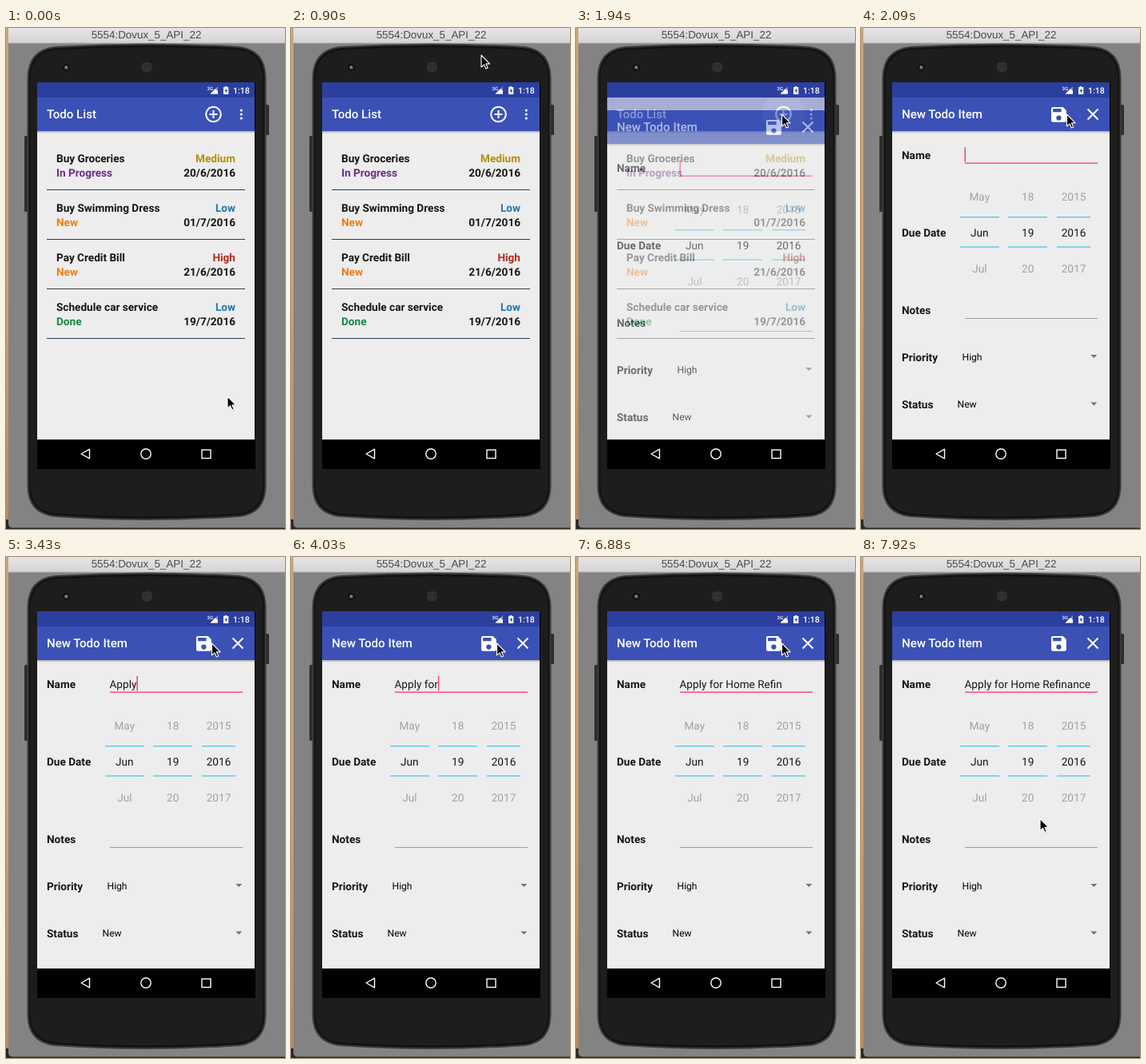
Write an HTML page that moves like this. It is 349x627 px and loops after 8000 ms.

```html
<!DOCTYPE html>
<html lang="en">
<head>
<meta charset="utf-8">
<title>Todo List</title>
<style>
html, body { margin: 0; width: 100%; height: 100%; overflow: hidden; background: #838383; }
svg { display: block; width: 349px; height: 627px; }
text { font: 400 13.6px Roboto, sans-serif; fill: #161616; text-rendering: geometricPrecision; white-space: pre; }
.b { font-weight: 700; }
.bar { font-size: 15.1px; font-weight: 500; fill: #fff; }
.spin { font-size: 12.1px; fill: #000; }
.end { text-anchor: end; }
.mid { text-anchor: middle; }
.dim { fill: #a0a0a0; }
</style>
</head>
<body>
<svg viewBox="0 0 349 627" xmlns="http://www.w3.org/2000/svg">
  <defs>
    <linearGradient id="wood" x2="0" y2="1">
      <stop offset="0" stop-color="#c9a47c"/><stop offset=".5" stop-color="#d3a26c"/><stop offset="1" stop-color="#bd8a58"/>
    </linearGradient>
    <linearGradient id="titleBg" x2="0" y2="1">
      <stop offset="0" stop-color="#e6e4e6"/><stop offset="1" stop-color="#d5d3d5"/>
    </linearGradient>
    <linearGradient id="shade" x2="0" y2="1">
      <stop offset="0" stop-color="#000" stop-opacity=".28"/><stop offset="1" stop-color="#000" stop-opacity="0"/>
    </linearGradient>
    <pattern id="mesh" width="2.4" height="2.4" patternUnits="userSpaceOnUse">
      <rect width="2.4" height="2.4" fill="#232323"/><circle cx="1.2" cy="1.2" r=".7" fill="#555"/>
    </pattern>
    <clipPath id="screen"><rect x="39" y="68" width="272" height="447"/></clipPath>
    <clipPath id="bar"><rect x="39" y="87" width="272" height="42"/></clipPath>
  </defs>

  <!-- window -->
  <rect width="349" height="627" fill="#838383"/>
  <rect width="3" height="616" fill="url(#wood)"/>
  <path d="M0 615H3V621Q3.500 625 8 625.500H349V627H0Z" fill="#2c2724"/>
  <rect x="3" width="346" height="19" fill="url(#titleBg)"/>
  <rect x="3" y="18.500" width="346" height="1" fill="#a9a8a9"/>
  <text x="175.500" y="13" class="mid" style="font:13.4px 'Liberation Sans',Arial,sans-serif;fill:#4a4a4a">5554:Dovux_5_API_22</text>

  <!-- phone -->
  <rect x="23" y="135" width="5" height="95" rx="1.500" fill="#2d2d2d"/>
  <rect x="324" y="96" width="5" height="38" rx="1.500" fill="#2d2d2d"/>
  <path d="M26.500 62Q27 27 61 23Q176 16 292 23Q325 27 325.500 62V574Q325 608 292 612Q176 620 61 612Q27 608 26.500 574Z" fill="#3b3b3b"/>
  <path d="M28.500 62Q29 29 61 25Q176 18 292 25Q323 29 323.500 62V574Q323 606 292 610Q176 618 61 610Q29 606 28.500 574Z" fill="#121212"/>
  <path d="M30.500 63Q31 31 62 27.500Q176 21 291 27.500Q321 31 321.500 63V573Q321 604 291 607.500Q176 615 62 607.500Q31 604 30.500 573Z" fill="#1d1d1d"/>
  <circle cx="75.500" cy="49.500" r="4.500" fill="#0f0f12"/>
  <circle cx="75.500" cy="49.500" r="2.500" fill="#4c4f62"/>
  <circle cx="75" cy="49" r="1.200" fill="#9599a8"/>
  <circle cx="176.500" cy="49" r="6.800" fill="url(#mesh)"/>

  <!-- screen -->
  <rect x="39" y="68" width="273" height="484" fill="#000"/>
  <g clip-path="url(#screen)">
    <g id="list"></g>
    <g id="form"></g>
    <rect x="39" y="68" width="272" height="19" fill="#2c3f9f"/>
    <text x="251.500" y="78" style="font-size:6px;font-weight:500;fill:#fff">3G</text>
    <path d="M265 73V82.500H255.500Z" fill="#fff" fill-opacity=".4"/>
    <path d="M262 76V82.500H255.500Z" fill="#fff"/>
    <path d="M265 79V82.500H262V76Z" fill="#fff"/>
    <path d="M272 74H273.700V73H276.300V74H278.300V83H272Z" fill="#fff"/>
    <path d="M275.800 75.500L273.500 79H275V81.500L277.100 78H275.800Z" fill="#2c3f9f"/>
    <text x="284" y="81.700" style="font-size:10.6px;font-weight:500;fill:#fff">1:18</text>
  </g>
  <g fill="none" stroke="#fff" stroke-width="1.400">
    <path d="M94 533L104.500 527.200V538.800Z" stroke-linejoin="round"/>
    <circle cx="175" cy="533" r="6.200"/>
    <rect x="245" y="528" width="11" height="10.500"/>
  </g>
  <g id="pointer">
    <path d="M.6 1.500V16L4 12.800L6.300 18.300L8.800 17.200L6.500 11.900H11Z" fill="#000" opacity=".18"/>
    <path d="M0 0V15L3.500 11.800L5.800 17L8.200 16L5.900 10.900H10.600Z" fill="#000" stroke="#fff" stroke-width="1.100" stroke-linejoin="round"/>
  </g>
</svg>
<script>
const $ = id => document.getElementById(id);
const text = (x, y, s, cls = '', fill) =>
  `<text x="${x}" y="${y}" class="${cls}"${fill ? ` style="fill:${fill}"` : ''}>${s}</text>`;
const rect = (x, y, w, h, fill) => `<rect x="${x}" y="${y}" width="${w}" height="${h}" fill="${fill}"/>`;
const page = title => rect(39, 68, 272, 447, '#ededed') + rect(39, 87, 272, 42, '#3b51b6') +
  rect(39, 129, 272, 3, 'url(#shade)') + text(51, 113.4, title, 'bar');

const COLORS = {
  Medium: '#b58f06', Low: '#1e78b0', High: '#b02c20',
  'In Progress': '#6a2d8a', New: '#ea7f14', Done: '#168846'
};
const TODOS = [
  ['Buy Groceries', 'In Progress', 'Medium', '20/6/2016'],
  ['Buy Swimming Dress', 'New', 'Low', '01/7/2016'],
  ['Pay Credit Bill', 'New', 'High', '21/6/2016'],
  ['Schedule car service', 'Done', 'Low', '19/7/2016']
];

$('list').innerHTML = page('Todo List') +
  '<circle id="ripple" cx="259.500" cy="108" r="27" fill="#fff" opacity=".09" clip-path="url(#bar)"/>' +
  '<circle id="ring" cx="259.500" cy="108" r="9.300" fill="none" stroke="#fff"/>' +
  '<path d="M254.500 108H264.500M259.500 103V113" stroke="#fff" stroke-width="2"/>' +
  [103, 108, 113].map(y => `<circle cx="294.300" cy="${y}" r="1.600" fill="#fff"/>`).join('') +
  TODOS.map(([name, status, priority, date], i) => {
    const y = 168 + i * 61.9;
    return text(63, y, name, 'b') + text(63, y + 18.300, status, 'b', COLORS[status]) +
      text(287, y, priority, 'b end', COLORS[priority]) + text(287, y + 18.300, date, 'b end') +
      rect(51, Math.round(y + 34), 248, 1, '#2c3e50');
  }).join('');

const PICKERS = [
  [124, 49, 148.3, ['May', 'Jun', 'Jul']],
  [184, 49, 208.7, [18, 19, 20]],
  [245, 42, 266, [2015, 2016, 2017]]
];
const labels = [['Name', 163.5], ['Due Date', 261], ['Notes', 358], ['Priority', 416.5], ['Status', 476]];
const arrow = y => `<path d="M287.300 ${y}H295.300L291.300 ${y + 4}Z" fill="#737373"/>`;

$('form').innerHTML = page('New Todo Item') +
  '<path transform="translate(234.800 95.800) scale(1.050)" fill="#fff" fill-rule="evenodd" d="M17 3H5A2 2 0 0 0 3 5V19A2 2 0 0 0 5 21H19A2 2 0 0 0 21 19V7ZM12 19A3 3 0 0 1 12 13A3 3 0 0 1 12 19ZM15 9H5V5H15Z"/>' +
  '<path d="M283.500 101.500L296.500 114.500M296.500 101.500L283.500 114.500" stroke="#fff" stroke-width="2"/>' +
  labels.map(([s, y]) => text(51, y, s, 'b')).join('') +
  rect(130, 168.5, 166, 1.4, '#f4457f') +
  '<text id="name" x="129.500" y="163.500"></text>' +
  '<rect id="caret" y="149" width="1.500" height="18.500" fill="#f4457f"/>' +
  PICKERS.map(([x, w, c, values]) =>
    rect(x, 236, w, 1.4, '#5cc5ec') + rect(x, 273.3, w, 1.4, '#5cc5ec') +
    values.map((v, i) => text(c, 216 + i * 45.1, v, i === 1 ? 'mid' : 'mid dim')).join('')
  ).join('') +
  rect(130, 363, 166, 1, '#9c9c9c') +
  text(126.5, 415.8, 'High', 'spin') + text(120.5, 475.3, 'New', 'spin') +
  arrow(409) + arrow(468.5);

const LOOP = 8000;
const ENTRY = 'Apply for Home Refinance';
// [time, x, y]
const MOVES = [[0, 277, 461], [600, 272, 390], [750, 254, 190], [900, 238, 34], [1040, 246, 62],
  [1190, 257.5, 108], [7770, 238, 236], [7920, 224, 327.5]];
// [first key, characters before it, number of keys], keys 150 ms apart
const BURSTS = [[2540, 0, 1], [2840, 1, 3], [3430, 4, 5], [4630, 10, 4],
  [5380, 14, 1], [5680, 15, 4], [6430, 19, 1], [7020, 20, 4]];
const CARET_OFF = [[2390, 2540], [6880, 7020], [7770, LOOP]];

const last = (rows, t) => rows.filter(r => r[0] <= t).pop();
const show = (id, on) => $(id).setAttribute('visibility', on ? 'inherit' : 'hidden');

function typed(t) {
  const burst = last(BURSTS, t);
  if (!burst) return 0;
  const [start, before, keys] = burst;
  return before + Math.min(keys, Math.floor((t - start + 2) / 150) + 1);
}

function draw(t) {
  const [, x, y] = last(MOVES, t);
  $('pointer').setAttribute('transform', `translate(${x} ${y})`);

  const pressed = t >= 1640;
  show('ripple', pressed);
  $('ring').setAttribute('stroke-width', pressed ? 2.5 : 2);

  const opening = t < 2090;
  $('form').setAttribute('display', t < 1940 ? 'none' : 'inline');
  $('form').setAttribute('opacity', opening ? 0.6 : 1);
  $('form').setAttribute('transform', `translate(0 ${opening ? 16 : 0})`);
  if (t < 1940) return;

  const name = $('name');
  const n = typed(t);
  name.textContent = ENTRY.slice(0, n);
  $('caret').setAttribute('x', 129.5 + (n ? name.getComputedTextLength() : 0));
  show('caret', !CARET_OFF.some(([a, b]) => t >= a && t < b));
}

let begin;
function tick(now) {
  begin ??= now;
  draw((now - begin) % LOOP);
  requestAnimationFrame(tick);
}
draw(0);
requestAnimationFrame(tick);
</script>
</body>
</html>
```
